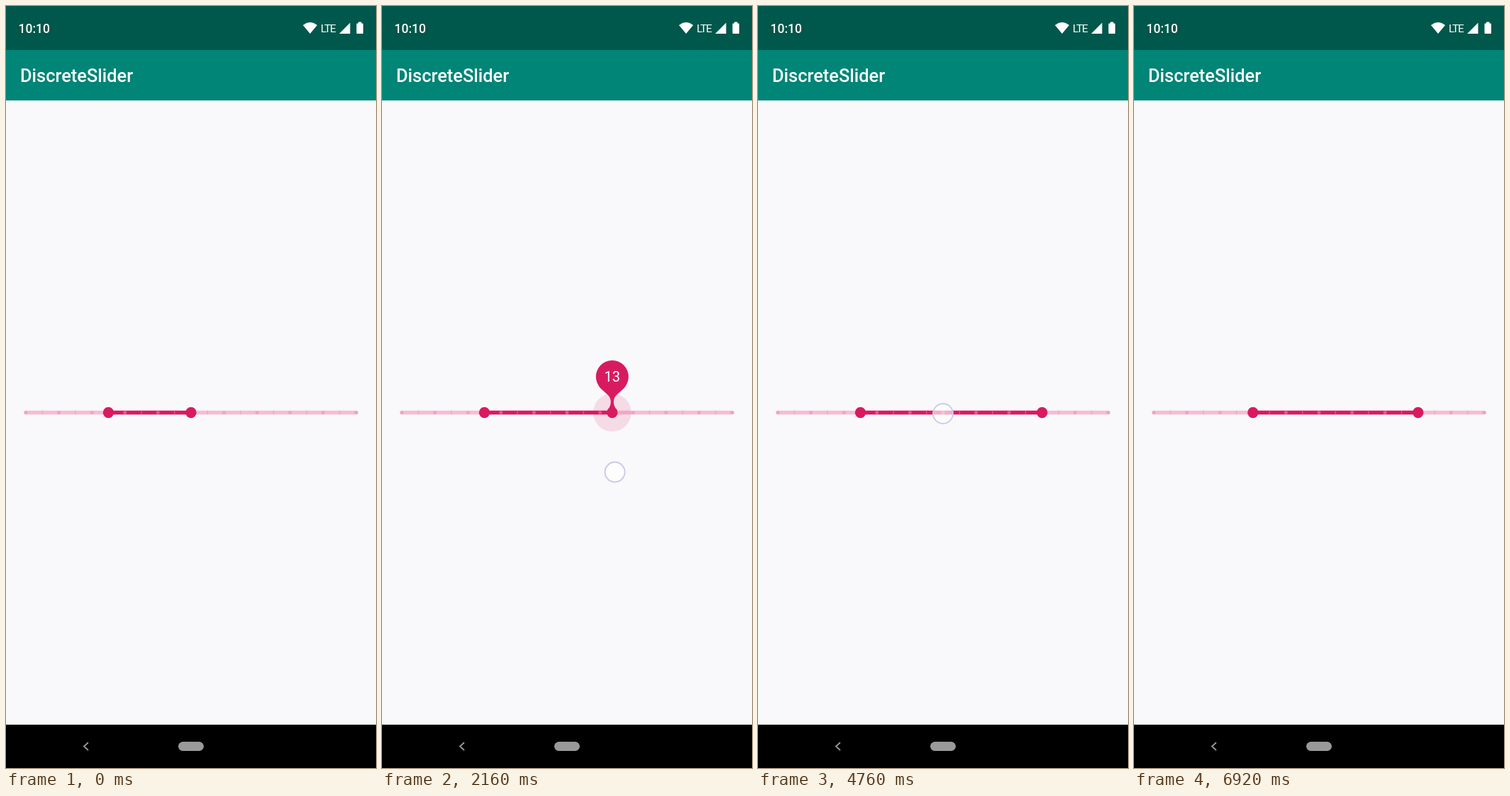
Recreate the animation shown at these times as an HTML page with a canvas. Size 522 by 1073 pixels, loop 6960 ms.

```html
<!DOCTYPE html>
<html lang="en">
<head>
<meta charset="utf-8">
<title>DiscreteSlider</title>
<style>
  html, body { margin: 0; width: 100%; height: 100%; overflow: hidden; }
  canvas { display: block; }
</style>
</head>
<body>
<canvas id="stage" width="522" height="1073"></canvas>
<script>
const ctx = document.getElementById('stage').getContext('2d');
const LOOP = 6960, ACCENT = '#d81b60', TRACK_Y = 572.5, LAST = 20;
const tickX = v => 28 + 23.3 * v;

// Keys are [time, value]; movement eases in and out between them.
const rightKeys = [[540, tickX(10)], [1130, 396], [1700, 236.5], [2620, 420],
  [3280, tickX(9)], [3920, tickX(9)], [4120, tickX(16)]];
const leftKeys = [[4800, tickX(5)], [5000, tickX(10)], [5640, tickX(10)],
  [6240, 120], [6740, tickX(6)]];
const THUMB_LAG = 12;

const touches = [
  { from: 470, to: 3320, x: rightKeys, drags: 'right',
    y: [[480, 576], [1400, 651], [1680, 644.5], [2100, 657], [2560, 641.5], [3300, 679]] },
  { from: 3830, to: 3930, x: [[0, 401]], y: [[0, 582]] },
  { from: 4750, to: 4810, x: [[0, 261]], y: [[0, 574]] },
  { from: 5590, to: 6790, x: leftKeys, drags: 'left',
    y: [[5600, 585.5], [6200, 659], [6500, 652], [6780, 665]] },
];

const clamp = v => Math.max(0, Math.min(1, v));
const ease = p => (1 - Math.cos(Math.PI * clamp(p))) / 2;

function at(keys, t) {
  let [time, value] = keys[0];
  for (const [nextTime, next] of keys.slice(1)) {
    if (t < nextTime) return value + (next - value) * ease((t - time) / (nextTime - time));
    [time, value] = [nextTime, next];
  }
  return value;
}

function rect(x, y, w, h, color, r = 0) {
  ctx.fillStyle = color;
  ctx.beginPath();
  ctx.roundRect(x, y, w, h, r);
  ctx.fill();
}

function disc(x, y, r, color) {
  ctx.fillStyle = color;
  ctx.beginPath();
  ctx.arc(x, y, r, 0, 2 * Math.PI);
  ctx.fill();
}

function text(str, x, y, font, align = 'left', spacing = 0) {
  ctx.font = font + ' Roboto, sans-serif';
  ctx.textAlign = align;
  ctx.letterSpacing = spacing + 'px';
  ctx.fillStyle = '#fff';
  ctx.fillText(str, x, y);
}

function drawChrome() {
  rect(0, 0, 522, 1073, '#f9f8fa');
  rect(0, 0, 522, 62, '#00574b');
  rect(0, 62, 522, 71, '#008577');
  rect(0, 1012, 522, 61, '#000');
  text('10:10', 17.5, 37.5, '500 17.5px');
  text('LTE', 444, 37, '15.5px', 'left', -1.2);
  text('DiscreteSlider', 20, 107, '500 25.4px');

  ctx.fill(new Path2D('M429 39L419 27Q429 19 439 27Z M470 39H485.5V23.5Z'));
  rect(494.5, 24.5, 9.5, 14.5, '#fff', 1);
  rect(497, 22.5, 4.5, 3, '#fff');

  ctx.strokeStyle = '#999';
  ctx.lineWidth = 1.8;
  ctx.stroke(new Path2D('M116 1037L110 1042.5L116 1048'));
  rect(243, 1036, 36, 13, '#999', 6.5);
}

function drawTrack(left, right) {
  rect(25.3, TRACK_Y - 2.7, 471.4, 5.4, '#f5bdd3', 2.7);
  rect(left, TRACK_Y - 2.7, right - left, 5.4, ACCENT);
  for (let v = 0; v <= LAST; v++) {
    const x = tickX(v), active = x > left && x < right;
    const color = active ? '#e4588f' : '#eca4c2';
    if (v % 2) rect(x - 0.6, TRACK_Y - 2.7, 1.2, 5.4, color);
    else disc(x, TRACK_Y, 2.5, color);
  }
}

function drawBubble(x, size) {
  ctx.save();
  ctx.translate(x, TRACK_Y);
  ctx.scale(size, size);
  disc(0, -50.5, 23, ACCENT);
  ctx.fill(new Path2D('M-18.8 -37.3C-13 -29 -2.2 -25 -2 -16C-2 -10 -4 -7 -7 -3' +
    'H7C4 -7 2 -10 2 -16C2.2 -25 13 -29 18.8 -37.3Z'));
  text(Math.round((x - 28) / 23.3), 0, -43.3, '20px', 'center');
  ctx.restore();
}

function drawTouch({ from, to, x, y }, t) {
  if (t < from || t > to + 80) return;
  ctx.globalAlpha = 1 - clamp((t - to) / 80);
  disc(at(x, t), at(y, t), 14, 'rgba(255,255,255,.65)');
  ctx.strokeStyle = '#cacde8';
  ctx.lineWidth = 2;
  ctx.stroke();
  ctx.globalAlpha = 1;
}

function draw(now) {
  const t = now % LOOP;
  const thumbs = { left: at(leftKeys, t - THUMB_LAG), right: at(rightKeys, t - THUMB_LAG) };
  drawChrome();
  drawTrack(thumbs.left, thumbs.right);

  const pressed = touches.filter(touch => touch.drags).map(({ from, to, drags }) => ({
    x: thumbs[drags],
    size: ease((t - from - 30) / 150) * (1 - ease((t - to) / 110)),
  })).filter(p => p.size > 0.01);

  for (const p of pressed) disc(p.x, TRACK_Y, 26.7 * p.size, 'rgba(216,27,96,.13)');
  disc(thumbs.left, TRACK_Y, 7.7, ACCENT);
  disc(thumbs.right, TRACK_Y, 7.7, ACCENT);
  for (const p of pressed) drawBubble(p.x, p.size);
  for (const touch of touches) drawTouch(touch, t);
}

const start = performance.now();
function frame() {
  draw(performance.now() - start);
  requestAnimationFrame(frame);
}
frame();
</script>
</body>
</html>
```
